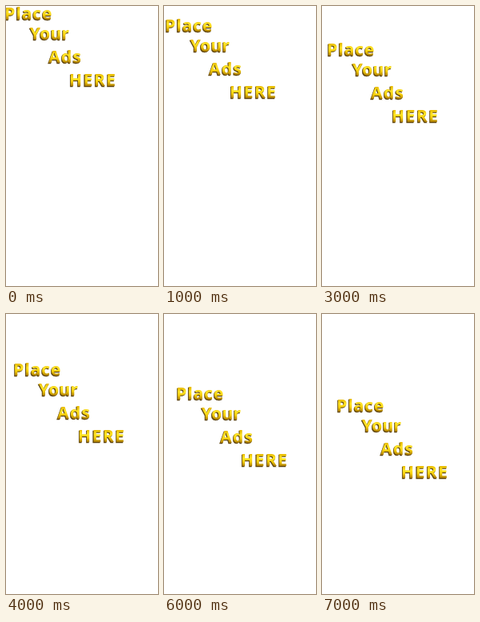
Recreate the animation shown at these times as an HTML page. Size 190 by 350 pixels, loop 8 s.

```html
<!DOCTYPE html>
<html lang="en">
<head>
<meta charset="utf-8">
<style>
html, body { margin: 0; width: 100%; height: 100%; overflow: hidden; background: #fff; }
svg { display: block; }
text { font: 700 21px "Open Sans", "Noto Sans", sans-serif; }
</style>
</head>
<body>
<svg width="190" height="350" viewBox="0 0 190 350">
  <defs>
    <linearGradient id="gold" x1="0" y1="0" x2="0" y2="1">
      <stop offset=".25" stop-color="#e9bd00"/>
      <stop offset=".42" stop-color="#ffe528"/>
      <stop offset=".58" stop-color="#f6cf0c"/>
      <stop offset=".78" stop-color="#a87800"/>
    </linearGradient>
  </defs>
  <g id="sign"></g>
</svg>
<script>
const STEP = 1000, STEPS = 8, DX = 2.8, DY = 15;
const sign = document.getElementById("sign");

// text, left, baseline, letter spacing
const lines = [
  ["Place", -2, 17.5, 0.9],
  ["Your", 29.5, 42.5, 0.3],
  ["Ads", 53, 71.5, 1.2],
  ["HERE", 78.8, 100.5, 1.5]
];

// offset, fill, outline: dark lower-left bevel under a gold face
const layers = [
  [-0.5, 0.5, "#5c4209", "#5c4209"],
  [0.3, -0.1, "url(#gold)", "none"]
];

function addText([str, x, y, gap], [dx, dy, fill, stroke]) {
  const t = document.createElementNS("http://www.w3.org/2000/svg", "text");
  const attrs = { x: x + dx, y: y + dy, fill, stroke, "stroke-width": 0.4, "letter-spacing": gap };
  for (const k in attrs) t.setAttribute(k, attrs[k]);
  t.textContent = str;
  sign.append(t);
}

for (const line of lines) for (const layer of layers) addText(line, layer);

function draw(ms) {
  const n = Math.floor(ms / STEP) % STEPS;
  sign.setAttribute("transform", `translate(${Math.round(n * DX)} ${n * DY})`);
}

const start = performance.now();
function tick() {
  draw(performance.now() - start);
  requestAnimationFrame(tick);
}
draw(0);
requestAnimationFrame(tick);
</script>
</body>
</html>
```
